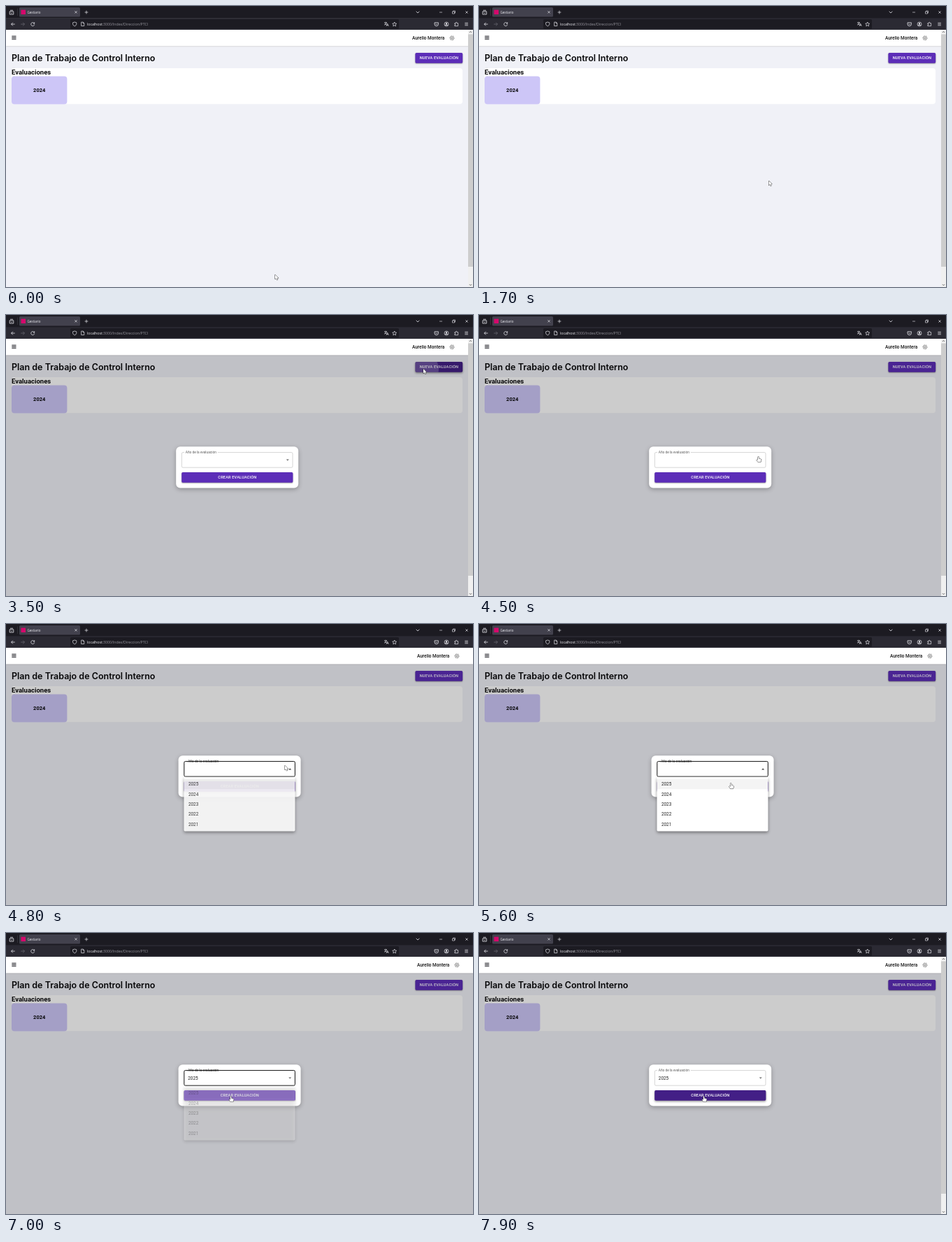
These frames come from a looping animation (668x402 px, 8000 ms). An HTML page with a canvas:

```html
<!DOCTYPE html>
<html lang="es">
<head>
<meta charset="utf-8">
<title>Plan de Trabajo</title>
<style>
html, body { margin: 0; width: 100%; height: 100%; overflow: hidden; background: #f0f1f7; }
canvas { display: block; width: 668px; height: 402px; }
</style>
</head>
<body>
<canvas id="stage"></canvas>
<script>
const W = 668, H = 402, LOOP = 8000, STEP = 100;
const canvas = document.getElementById('stage');
const ctx = canvas.getContext('2d');
const ratio = window.devicePixelRatio || 1;
canvas.width = W * ratio;
canvas.height = H * ratio;

const UI = '"Open Sans", sans-serif', BODY = 'Roboto, sans-serif', HEAD = 'Inter, sans-serif';
const PURPLE = [92, 45, 184], PURPLE_DARK = [67, 31, 134];
const YEARS = ['2025', '2024', '2023', '2022', '2021'];

// Pointer tip: time, x, y
const POINTER = [
  [0, 385, 384.5], [500, 385, 384.5], [600, 400, 342], [700, 419.5, 296.5], [800, 419.5, 296.5],
  [900, 424, 290], [1100, 421, 268], [1400, 415.5, 250], [1600, 415.5, 250], [1700, 414.5, 250],
  [1900, 414.5, 250], [2200, 446, 216], [2500, 535, 130], [2800, 592, 86], [2900, 597, 81],
  [3100, 599, 78], [3400, 599, 78], [3500, 597, 77], [3700, 572, 92], [4100, 440, 184],
  [4500, 399, 202.5], [5100, 399, 202.5], [5500, 368, 222], [6000, 326, 250],
  [6100, 326, 254], [6400, 321.5, 235], [6600, 321, 233.5], [8000, 321, 233.5]
];

const clamp = v => Math.max(0, Math.min(1, v));
const ramp = (t, a, b) => clamp((t - a) / (b - a));
const mix = (a, b, k) => a + (b - a) * k;
const blend = (a, b, k) => `rgb(${a.map((v, i) => Math.round(mix(v, b[i], k)))})`;

function pointerAt(t) {
  const i = Math.max(1, POINTER.findIndex(p => p[0] >= t));
  const a = POINTER[i - 1], b = POINTER[i], k = ramp(t, a[0], b[0]);
  return [mix(a[1], b[1], k), mix(a[2], b[2], k)];
}

function rect(x, y, w, h, fill) {
  ctx.fillStyle = fill;
  ctx.fillRect(x, y, w, h);
}

function round(x, y, w, h, r, fill, shadow) {
  ctx.save();
  if (shadow) {
    ctx.shadowColor = `rgba(0,0,0,${shadow[2]})`;
    ctx.shadowOffsetY = shadow[0] * ratio;
    ctx.shadowBlur = shadow[1] * ratio;
  }
  ctx.beginPath();
  ctx.roundRect(x, y, w, h, r);
  ctx.fillStyle = fill;
  ctx.fill();
  ctx.restore();
}

function text(str, x, y, size, weight, family, color, align = 'left', spacing = 0) {
  ctx.font = `${weight} ${size}px ${family}`;
  ctx.letterSpacing = spacing + 'px';
  ctx.textAlign = align;
  ctx.fillStyle = color;
  ctx.fillText(str, x, y);
  ctx.letterSpacing = '0px';
}

function icon(d, x, y, color, width = 0.8) {
  ctx.save();
  ctx.translate(x, y);
  ctx.strokeStyle = color;
  ctx.lineWidth = width;
  ctx.lineJoin = 'round';
  ctx.stroke(new Path2D(d));
  ctx.restore();
}

function shape(d, x, y, color) {
  ctx.save();
  ctx.translate(x, y);
  ctx.fillStyle = color;
  ctx.fill(new Path2D(d));
  ctx.restore();
}

const CROSS = 'M-1.6-1.6L1.6 1.6M1.6-1.6L-1.6 1.6';
const BOX = 'M-2-2H2V2H-2Z';
const CIRCLE = 'M3 0A3 3 0 1 1-3 0A3 3 0 1 1 3 0';

function drawBrowser() {
  const light = '#e8e8ee';
  rect(0, 0, W, 17.5, '#1c1b22');
  rect(0, 17.5, W, 16.5, '#2b2a33');
  icon('M-2.8-1.2H2.8V3H-2.8ZM-2-2.8H2M-1 .6L0 1.6L1 .6', 8, 9, light);
  rect(16, 3.5, 0.5, 10.5, '#45444d');
  round(19, 2, 87, 13.5, 1.6, '#42414d');
  round(21.5, 5.5, 6.5, 6.5, 0, '#d5086c');
  text('Gestiario', 30.5, 10.6, 4.5, 400, UI, '#f4f4f8');
  icon(CROSS, 100, 8.8, light, 0.7);
  icon('M-2.4 0H2.4M0-2.4V2.4', 115, 9, light, 0.7);
  icon('M-2.3-1.1L0 1.2L2.3-1.1', 589, 8.8, light);
  icon('M-2 0H2', 622, 9, light, 0.6);
  icon('M-2-1H1V2H-2ZM-1-1V-2H2V1H1', 640.5, 9, light, 0.6);
  icon(CROSS, 659, 9, light, 0.7);

  icon('M2.7 0H-2.5M-.2-2.3L-2.5 0L-.2 2.3', 10, 26, light);
  icon('M-2.7 0H2.5M.2-2.3L2.5 0L.2 2.3', 24, 26, '#686770');
  icon('M2.2-1.2A2.5 2.5 0 1 0 2.5 .5M2.5-2.7V-.8H.6', 38.2, 26, light);

  round(92, 19, 470, 13.5, 1.6, '#1c1b22');
  icon('M0-2.8L2.6-2V0C2.6 1.5 1.2 2.6 0 3C-1.2 2.6-2.6 1.5-2.6 0V-2Z', 98.2, 25.8, light, 0.7);
  icon('M-2-2.7H.7L2.1-1.2V2.7H-2ZM.6-2.6V-1H2', 109.7, 25.8, light, 0.7);
  text('localhost', 116, 27.8, 5.2, 400, UI, '#f4f4f8');
  const host = ctx.measureText('localhost').width;
  text(':3000/Index/Direccion/PTCI', 116 + host, 27.8, 5.2, 400, UI, '#97969e');
  icon('M-3-2H1M-1-3V-2M.3-2C0-.3-1.5 1-3 1.3M-2-1C-1.4 .2-.6 .7 .2 1M0 3L1.6-.7L3.2 3M.6 1.8H2.6', 544, 25.8, light, 0.7);
  icon('M0-3L.9-1L3-.8L1.4 .7L1.9 2.8L0 1.7L-1.9 2.8L-1.4 .7L-3-.8L-.9-1Z', 555.7, 26, light, 0.7);
  icon('M-2.7-2.2H2.7V0A2.7 2.7 0 0 1-2.7 0ZM-1.3-.5L0 .8L1.3-.5', 615.7, 26, light, 0.8);
  icon(CIRCLE, 630, 26, light, 0.7);
  shape('M-1.1-.8A1.1 1.1 0 1 1 1.1-.8A1.1 1.1 0 1 1-1.1-.8M-2 1.8C-1.6 .2 1.6 .2 2 1.8Z', 630, 26, light);
  icon('M-2.5-1.4H-.9C-1.2-3.3 1-3.3 .7-1.4H2.3V2.6H-2.5V1.2C-.8 1.5-.8-.4-2.5-.1Z', 644.3, 26, light, 0.7);
  icon('M-2.3-1.8H2.3M-2.3 0H2.3M-2.3 1.8H2.3', 658.6, 26, light, 0.7);
}

function drawButton(label, x, y, w, h, hover) {
  round(x, y, w, h, 1.7, blend(PURPLE, PURPLE_DARK, hover), [mix(0.8, 1.4, hover), mix(1.6, 3, hover), 0.42]);
  text(label, x + w / 2 + 0.1, y + h / 2 + 2, 5.6, 500, BODY, '#fff', 'center', 0.16);
}

function drawPage(t, dim, locked) {
  rect(0, 34, W, H - 34, '#f0f1f7');
  text('Plan de Trabajo de Control Interno', 8, 78.8, 12.5, 600, HEAD, '#08080a');
  round(8, 89, 645, 51.3, 4, '#fff');
  text('Evaluaciones', 8, 98.2, 9.5, 700, BODY, '#08080a');
  round(8, 100.6, 79.4, 39.8, 4, '#cdc6f7');
  text('2024', 47.7, 123.3, 7.5, 700, BODY, '#08080a', 'center');

  const hover = ramp(t, 2800, 3100) * (1 - ramp(t, 3500, 3800));
  drawButton('NUEVA EVALUACIÓN', 585.4, 67, 67.8, 14.8, hover);
  if (t >= 3500 && t < 4000) {
    ctx.save();
    ctx.beginPath();
    ctx.roundRect(585.4, 67, 67.8, 14.8, 1.7);
    ctx.clip();
    ctx.beginPath();
    ctx.arc(598, 77, mix(21, 62, ramp(t, 3500, 3800)), 0, 7);
    ctx.fillStyle = `rgba(255,255,255,${0.22 * (1 - ramp(t, 3500, 4000))})`;
    ctx.fill();
    ctx.restore();
  }

  if (dim) rect(0, 57, W, H - 57, 'rgba(0,0,0,.2)');
  round(0, 34, W, 23.4, 0, '#fff', [0.5, 1.6, 0.4]);
  for (let i = 0; i < 4; i++) rect(8.3, 42.4 + i * 1.55, 6.2, 1.2, '#66666a');

  const shift = locked ? 7 : 0;
  text('Aurelio Montera', 581 + shift, 48.2, 6.45, 500, BODY, '#111');
  drawGear(638 + shift, 45.8);
}

function drawGear(x, y) {
  ctx.beginPath();
  for (let i = 0; i < 24; i++) {
    const a = i * Math.PI / 12, r = i % 4 < 2 ? 3.1 : 2.3;
    ctx.lineTo(x + r * Math.cos(a), y + r * Math.sin(a));
  }
  ctx.closePath();
  ctx.strokeStyle = '#555';
  ctx.lineWidth = 0.65;
  ctx.stroke();
  ctx.beginPath();
  ctx.arc(x, y, 1, 0, 7);
  ctx.stroke();
}

function drawScrollbar() {
  rect(661, 34, 7, H - 34, '#f0f0f0');
  rect(661, 40.5, 7, 332.5, '#cdcdcd');
  icon('M-1.6 .8L0-.8L1.6 .8', 664.5, 37.2, '#555', 0.9);
  icon('M-1.6-.8L0 .8L1.6-.8', 664.5, 399, '#555', 0.9);
}

function drawDialog(t, x, open) {
  const focused = t >= 4700 && t < 7900;
  round(x, 188.3, 175, 59.2, 6, '#fff', [2, 6, 0.28]);

  ctx.strokeStyle = focused ? '#111' : '#b9b9b9';
  ctx.lineWidth = focused ? 1 : 0.6;
  ctx.beginPath();
  ctx.roundRect(x + 8.2, 196.6, 158.6, 21.6, 1.7);
  ctx.stroke();
  if (!focused) rect(x + 12, 195.8, 47.5, 1.6, '#fff');
  text('Año de la evaluación', x + 13.6, 197.8, 4.8, 400, BODY, focused ? '#222' : '#5c5c5c');
  if (t >= 6900) text('2025', x + 13.6, 209.9, 6.4, 400, BODY, '#222');
  shape(open ? 'M-2 1L0-1L2 1Z' : 'M-2-1L0 1L2-1Z', x + 159.6, 207.6, open ? '#333' : '#666');

  drawButton('CREAR EVALUACIÓN', x + 8, 225, 159.2, 14.8, ramp(t, 7200, 7400));
}

function drawMenu(alpha) {
  ctx.save();
  ctx.globalAlpha = alpha;
  round(254.5, 218.8, 159, 77.6, 1.6, '#fff', [2, 4.5, 0.42]);
  rect(254.5, 222, 159, 14.2, 'rgba(0,0,0,.045)');
  YEARS.forEach((year, i) => text(year, 260.9, 231.3 + i * 14.35, 6.4, 400, BODY, '#222'));
  ctx.restore();
}

const ARROW = new Path2D('M0 0V6.5L1.5 5.1L2.6 7.5L3.6 7.1L2.6 4.7H4.6Z');
const HAND = new Path2D('M-.7 .7A.7 .7 0 0 1 .7 .7V3L3.3 3.6C4 3.8 4.1 4.3 4 5L3.4 8H-.6L-2.3 5.3C-2.6 4.6-1.8 4.1-1.2 4.8L-.7 5.3Z');

function drawPointer(t) {
  const [x, y] = pointerAt(t);
  const hand = (t >= 2900 && t < 3500) || (t >= 4400 && t < 4700) || (t > 5200 && y > 219);
  ctx.save();
  ctx.translate(x + (hand ? 0.6 : 0), y);
  ctx.lineJoin = 'round';
  ctx.lineWidth = 0.9;
  ctx.strokeStyle = '#222';
  ctx.fillStyle = '#fff';
  ctx.stroke(hand ? HAND : ARROW);
  ctx.fill(hand ? HAND : ARROW);
  ctx.restore();
}

function draw(t) {
  ctx.setTransform(ratio, 0, 0, ratio, 0, 0);
  ctx.textBaseline = 'alphabetic';
  const dialog = t >= 3500;
  const locked = t >= 4700 && t < 7100;
  const open = t >= 4700 && t < 6900;
  const menu = t < 6800 ? ramp(t, 4600, 4700) * mix(0.45, 0.9, ramp(t, 4700, 4800)) + 0.1 * ramp(t, 4800, 4900)
    : 1 - ramp(t, 6800, 7100);
  drawPage(t, dialog, locked);
  if (!locked) drawScrollbar();
  drawBrowser();
  if (dialog) drawDialog(t, locked ? 246.6 : 243.2, open);
  if (menu > 0) drawMenu(menu);
  drawPointer(t);
}

function tick(now) {
  draw(Math.floor(now % LOOP / STEP) * STEP);
  requestAnimationFrame(tick);
}
draw(0);
requestAnimationFrame(tick);
</script>
</body>
</html>
```
